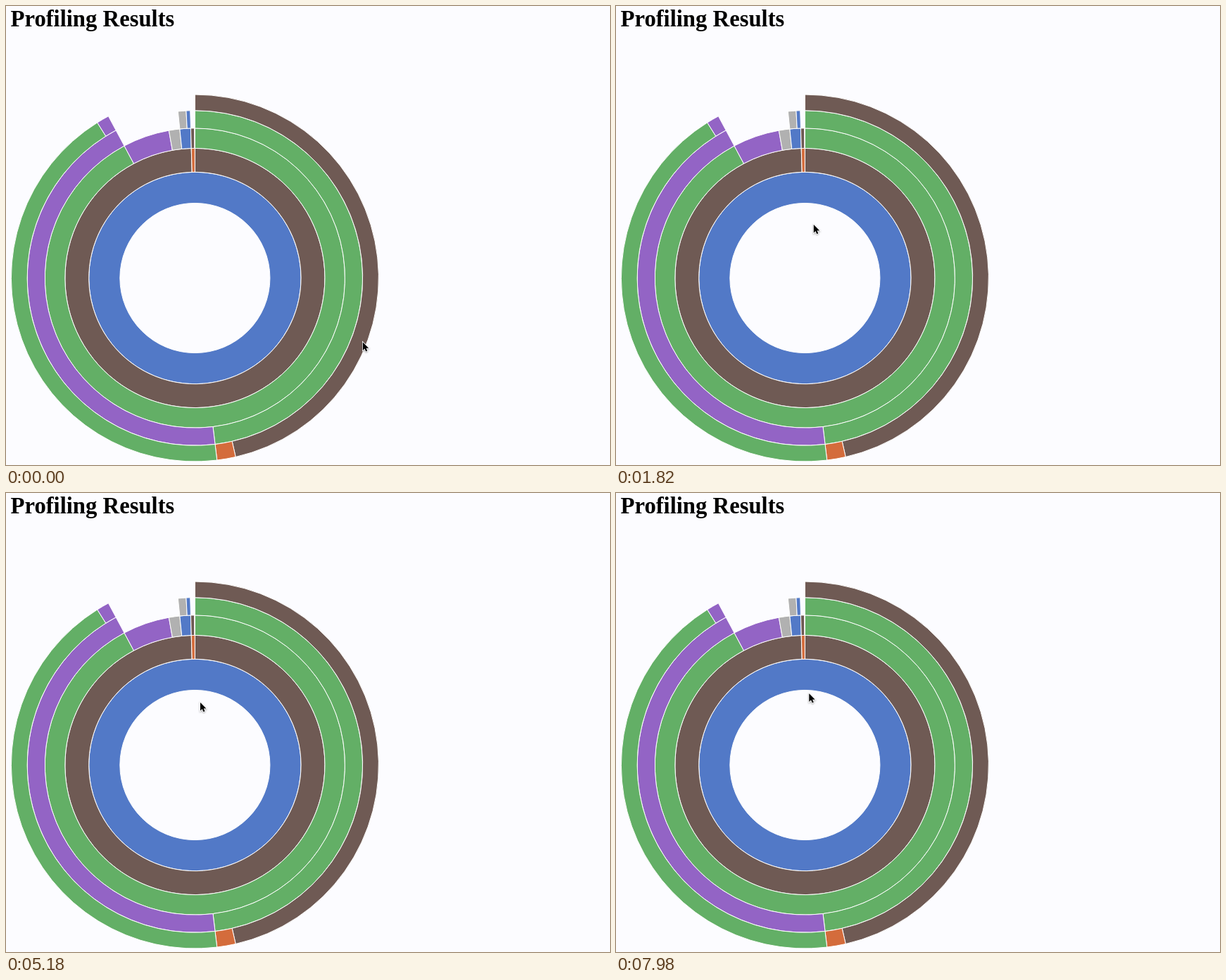
Write an HTML page that moves like this. It is 858 by 653 pixels and loops after 8 s.

```html
<!DOCTYPE html>
<html lang="en">
<head>
<meta charset="utf-8">
<title>Profiling Results</title>
<style>
  html, body { margin: 0; width: 100%; height: 100%; overflow: hidden; background: #fcfcff; }
  svg { display: block; width: 858px; height: 653px; }
  text { font: bold 32.7px "Liberation Serif", "Times New Roman", serif; }
  #chart path { stroke: #fff; stroke-width: 1; }
  #cursor { filter: drop-shadow(0 1px 1px rgba(0, 0, 0, .35)); }
</style>
</head>
<body>
<svg viewBox="0 0 858 653">
  <text x="6.5" y="29">Profiling Results</text>
  <g id="chart" transform="translate(268.4 387)"></g>
  <path id="cursor" d="M0 0V11.8L2.7 9.3L4.4 13.3L6.5 12.4L4.8 8.5H8.4Z"
    stroke="#fff" stroke-width="1.6" paint-order="stroke"/>
</svg>
<script>
const DURATION = 8000;
const OUTER_RADIUS = 261;
const LEVELS = 6;
const BLUE = '#5279c7', BROWN = '#6f5a54', ORANGE = '#d46c3c',
      GREEN = '#63af66', PURPLE = '#9364c5', GRAY = '#b1b1b1';

// Each ring lists [start, end, colour], in degrees clockwise from the top.
const rings = [
  [[0, 360, BLUE]],
  [[0, 358.4, BROWN], [358.4, 360, ORANGE]],
  [[0, 331.9, GREEN], [331.9, 350, PURPLE], [350, 354.2, GRAY],
   [354.2, 358.4, BLUE], [358.4, 359.8, BROWN]],
  [[0, 173.1, GREEN], [173.1, 331.9, PURPLE], [354.2, 357, GRAY], [357, 358.4, BLUE]],
  [[0, 167.2, BROWN], [167.2, 173.1, ORANGE], [173.1, 327.9, GREEN], [327.9, 331.9, PURPLE]]
];

// Areas of successive levels are equal.
const radiusOf = level => OUTER_RADIUS * Math.sqrt(level / LEVELS);

function point(radius, degrees) {
  const a = degrees * Math.PI / 180;
  return `${radius * Math.sin(a)} ${-radius * Math.cos(a)}`;
}

function circle(r) {
  return `M0 ${-r}A${r} ${r} 0 1 1 0 ${r}A${r} ${r} 0 1 1 0 ${-r}Z`;
}

function sector(inner, outer, start, end) {
  if (end - start >= 360) return circle(outer) + circle(inner);
  const large = end - start > 180 ? 1 : 0;
  return `M${point(outer, start)}A${outer} ${outer} 0 ${large} 1 ${point(outer, end)}` +
         `L${point(inner, end)}A${inner} ${inner} 0 ${large} 0 ${point(inner, start)}Z`;
}

document.getElementById('chart').innerHTML = rings.map((ring, i) =>
  ring.map(([start, end, colour]) =>
    `<path fill="${colour}" fill-rule="evenodd" d="${sector(radiusOf(i + 1), radiusOf(i + 2), start, end)}"/>`
  ).join('')).join('');

// Pointer path: [time, x, y].
const route = [
  [0, 506.8, 478.2], [220, 595, 400], [400, 622, 250], [600, 470, 110], [800, 300, 120],
  [1020, 281, 202], [1400, 281, 290], [1820, 280.8, 311], [2420, 279, 306],
  [3400, 276, 302.5], [5180, 276, 298], [7300, 276, 321.3], [7980, 274.3, 285.3], [8000, 274.3, 285.3]
];

function slope(i, axis) {
  const a = route[Math.max(i - 1, 0)], b = route[i], c = route[Math.min(i + 1, route.length - 1)];
  const turns = (b[axis] - a[axis]) * (c[axis] - b[axis]) <= 0;
  return turns ? 0 : (c[axis] - a[axis]) / (c[0] - a[0]);
}

function hermite(i, axis, time) {
  const a = route[i], b = route[i + 1], span = b[0] - a[0];
  const u = (time - a[0]) / span, v = 1 - u;
  return v * v * (1 + 2 * u) * a[axis] + u * u * (1 + 2 * v) * b[axis] +
         span * u * v * (v * slope(i, axis) - u * slope(i + 1, axis));
}

const cursor = document.getElementById('cursor');

function draw() {
  const time = performance.now() % DURATION;
  const i = route.findIndex(key => key[0] > time) - 1;
  cursor.setAttribute('transform', `translate(${hermite(i, 1, time)} ${hermite(i, 2, time)})`);
  requestAnimationFrame(draw);
}
draw();
</script>
</body>
</html>
```
